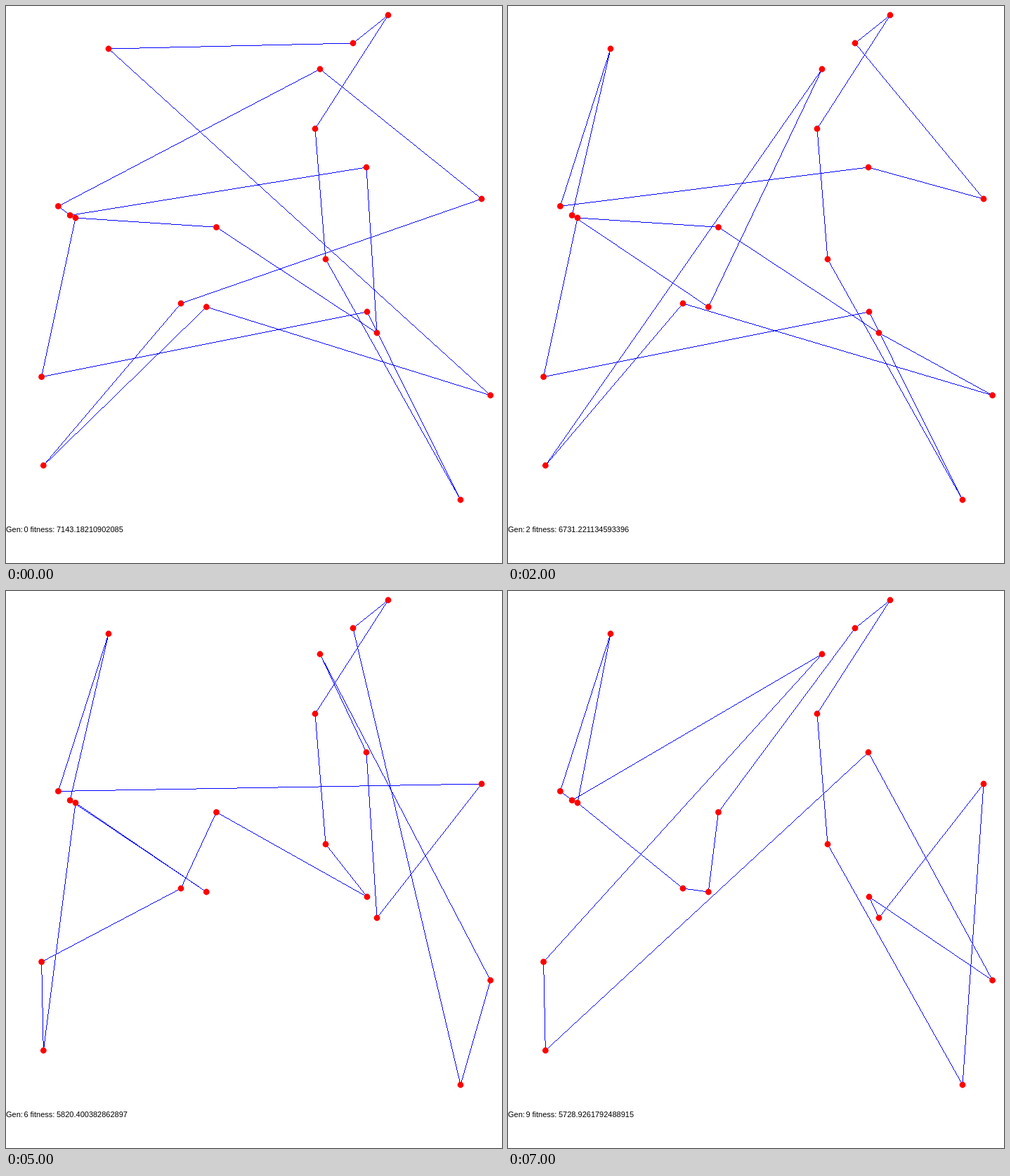
An HTML page with a canvas for the animation above (8 s loop, 706x794 px).

```html
<!DOCTYPE html>
<html lang="en">
<head>
<meta charset="utf-8">
<title>Evolving tour</title>
<style>
  html, body { margin: 0; width: 706px; height: 794px; overflow: hidden; background: #fff; }
  canvas { display: block; }
</style>
</head>
<body>
<canvas id="stage" width="706" height="794"></canvas>
<script>
const ctx = document.getElementById("stage").getContext("2d");
const STEP = 1000;
const RADIUS = 4.4;

const cities = {
  A: [146, 61], B: [494, 53], C: [544, 13], D: [447, 90], E: [440, 175],
  F: [513, 230], G: [677, 275], H: [74.4, 285.4], I: [91.2, 298.4], J: [99, 302],
  K: [299.5, 315.3], L: [455, 361], M: [249, 424], N: [285.3, 429], O: [514, 436],
  P: [528, 466], Q: [50.6, 528.7], R: [689.6, 555], S: [53.3, 655], T: [647, 704]
};

const generations = [
  { gen: 0, tour: "ABCELTOQJKPFIHDGMSNR", fitness: "7143.18210902085" },
  { gen: 1, tour: "AHIDQSFROPCLKTEBGNMJ", fitness: "6812.063375714383" },
  { gen: 2, tour: "AHFGBCELTOQJKPRMSDNI", fitness: "6731.221134593396" },
  { gen: 3, tour: "AHGBTPRLDKFOCEMQSJNI", fitness: "6649.266427933762" },
  { gen: 4, tour: "AHGBCELTOPFDRKMQSJNI", fitness: "5891.740265318427" },
  { gen: 6, tour: "AHGPFDRTBCELOKMQSJNI", fitness: "5820.400382862897" },
  { gen: 8, tour: "AHGFPODRTBCELKMQSJNI", fitness: "5796.318540927163" },
  { gen: 9, tour: "AHIDQSFROPGTLECBKNMJ", fitness: "5728.9261792488915" }
];

// One hard-edged pixel for each row or column along the longer axis.
function drawLine(from, to) {
  const long = Math.abs(to[0] - from[0]) > Math.abs(to[1] - from[1]) ? 0 : 1;
  const [a, b] = from[long] < to[long] ? [from, to] : [to, from];
  const slope = (b[1 - long] - a[1 - long]) / (b[long] - a[long]);
  for (let u = Math.floor(a[long]); u < b[long]; u++) {
    const v = Math.floor(a[1 - long] + slope * (u + 0.5 - a[long]));
    ctx.fillRect(long ? v : u, long ? u : v, 1, 1);
  }
}

function drawDot([x, y]) {
  ctx.beginPath();
  ctx.arc(x, y, RADIUS, 0, 2 * Math.PI);
  ctx.fill();
}

function draw({ gen, tour, fitness }) {
  ctx.fillStyle = "#fff";
  ctx.fillRect(0, 0, 706, 794);

  ctx.fillStyle = "#00f";
  [...tour].forEach((name, i) => {
    drawLine(cities[name], cities[tour[(i + 1) % tour.length]]);
  });

  ctx.fillStyle = "#f00";
  Object.values(cities).forEach(drawDot);

  ctx.fillStyle = "#000";
  ctx.font = '11px "Liberation Sans", Arial, sans-serif';
  ctx.fillText("Gen:", 0, 750);
  ctx.fillText(gen, 25.5, 750);
  ctx.fillText("fitness:", 34.5, 750);
  ctx.fillText(fitness, 72, 750);
}

const start = performance.now();
let shown = -1;

function tick() {
  const index = Math.floor((performance.now() - start) / STEP) % generations.length;
  if (index !== shown) {
    draw(generations[index]);
    shown = index;
  }
  requestAnimationFrame(tick);
}
tick();
</script>
</body>
</html>
```
